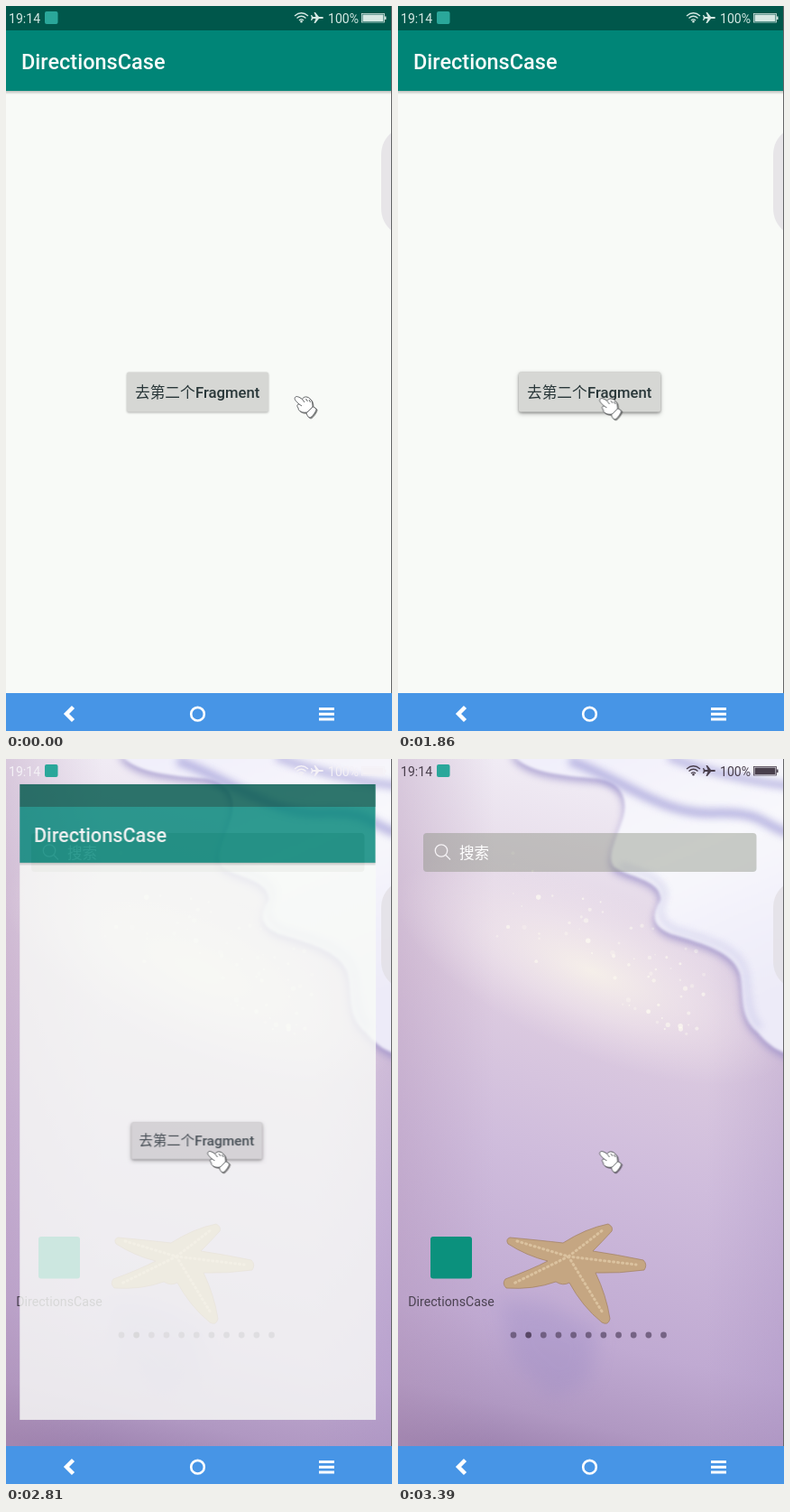
Recreate the animation shown at these times as an HTML page. Size 428 px wide and 803 px high, loop 3.49 s.

```html
<!DOCTYPE html>
<html lang="zh">
<head>
<meta charset="utf-8">
<title>Fragment demo</title>
<style>
  html, body { margin: 0; width: 100%; height: 100%; overflow: hidden; background: #f8faf7; }
  svg { display: block; width: 428px; height: 803px; }
  text { font-family: Roboto, "Noto Sans CJK SC", "Noto Sans CJK", sans-serif; }
  .medium { font-weight: 500; }
  #app { transform-origin: 200px 366px; }
  #status { color: #d5e8e3; font-size: 14.1px; }
  #raised, #ripple { opacity: 0; }
  #rest { filter: drop-shadow(0 1px 1px rgba(0, 0, 0, .28)); }
  #raised { filter: drop-shadow(0 2.5px 2.8px rgba(0, 0, 0, .3)); }
  #hand { filter: drop-shadow(1px 1.5px .7px rgba(0, 0, 0, .45)); }
</style>
</head>
<body>
<svg viewBox="0 0 428 803">
  <defs>
    <linearGradient id="sand" x1=".25" y1="0" x2=".12" y2="1">
      <stop offset="0" stop-color="#f0ebf4"/>
      <stop offset=".16" stop-color="#e6dbe9"/>
      <stop offset=".34" stop-color="#dccbe0"/>
      <stop offset=".55" stop-color="#cfbcdc"/>
      <stop offset=".8" stop-color="#c0aad2"/>
      <stop offset=".92" stop-color="#b098c2"/>
      <stop offset="1" stop-color="#9a7fac"/>
    </linearGradient>
    <linearGradient id="edge">
      <stop offset="0" stop-color="#b394b8" stop-opacity=".36"/>
      <stop offset=".25" stop-color="#b394b8" stop-opacity="0"/>
      <stop offset=".8" stop-color="#9f86bd" stop-opacity="0"/>
      <stop offset="1" stop-color="#9f86bd" stop-opacity=".25"/>
    </linearGradient>
    <radialGradient id="glow">
      <stop offset="0" stop-color="#f9f4ea" stop-opacity=".85"/>
      <stop offset=".5" stop-color="#f5ecee" stop-opacity=".5"/>
      <stop offset="1" stop-color="#f0e4ec" stop-opacity="0"/>
    </radialGradient>
    <linearGradient id="foam" x1="0" y1="0" x2=".4" y2="1">
      <stop offset="0" stop-color="#f0eefa"/>
      <stop offset=".5" stop-color="#f8f8fc"/>
      <stop offset="1" stop-color="#edebf8"/>
    </linearGradient>
    <linearGradient id="under" x1="0" y1="0" x2="0" y2="1">
      <stop offset="0" stop-opacity=".3"/>
      <stop offset="1" stop-opacity="0"/>
    </linearGradient>
    <filter id="soft" x="-30%" y="-30%" width="160%" height="160%"><feGaussianBlur stdDeviation="4"/></filter>
    <filter id="haze" x="-30%" y="-30%" width="160%" height="160%"><feGaussianBlur stdDeviation="11"/></filter>
    <filter id="smooth"><feGaussianBlur stdDeviation="1.5"/></filter>
    <clipPath id="buttonClip"><rect x="134" y="405.5" width="157" height="44" rx="2"/></clipPath>
    <clipPath id="screen"><rect width="428" height="762"/></clipPath>
    <path id="wave" d="M125-8C140 16 180 18 222 22C246 26 256 42 249 66C241 90 230 110 240 120
      C258 132 292 134 291 156C279 176 284 186 303 194C340 205 372 214 379 238C384 260 377 284 398 302
      C408 314 418 323 436 328V-8Z"/>
  </defs>

  <g id="home" clip-path="url(#screen)">
    <rect width="428" height="762" fill="url(#sand)"/>
    <rect width="428" height="762" fill="url(#edge)"/>
    <ellipse cx="215" cy="235" rx="235" ry="90" fill="url(#glow)" transform="rotate(24 215 235)"/>
    <g id="sparkles" fill="#fffdf2"/>
    <use href="#wave" fill="#9489c6" opacity=".7" filter="url(#soft)" transform="translate(-1 5)"/>
    <use href="#wave" fill="url(#foam)" filter="url(#smooth)"/>
    <g fill="none" stroke="#9c98d6" filter="url(#soft)" opacity=".75">
      <path d="M190 2C250 22 290 62 350 60S405 76 435 82" stroke-width="9"/>
      <path d="M246 118C266 126 292 128 296 150C286 172 292 182 308 189C345 200 377 208 385 234
        C390 258 385 280 402 298" stroke-width="4" opacity=".6"/>
      <path d="M300-2Q365 22 435 30" stroke-width="7"/>
    </g>
    <path d="M112 600L165 604L222 634L212 690L172 708L128 668Z" fill="#9687c4" opacity=".3" filter="url(#haze)"/>
    <path d="M124 530Q157 533 183 536Q208 520 233 515Q239 518 237 523Q226 535 216 545Q243 549 272 555
      Q277 560 273 566Q245 570 219 569Q231 594 235 620Q233 628 226 624Q204 606 190 580
      Q183 584 175 579Q150 588 120 586Q115 581 119 576Q149 565 166 556Q142 550 122 537Q119 532 124 530Z"
      fill="#c5a682" stroke="#a58468" stroke-width=".8"/>
    <path d="M132 534L189 551L228 521M189 551L264 560M189 551L228 615M189 551L128 581"
      fill="none" stroke="#dbc29f" stroke-width="3" stroke-linecap="round" stroke-dasharray="1 4"/>

    <rect x="28" y="82" width="369.5" height="43" rx="4" fill="#878c7c" fill-opacity=".42"/>
    <g fill="none" stroke="#f5f2f5" stroke-width="1.3"><circle cx="48" cy="101.500" r="6.7"/><path d="M53 106.500l5 5"/></g>
    <text x="68" y="109.500" font-size="16.6" fill="#fff">搜索</text>
    <rect x="36" y="529" width="46" height="46.500" rx="3" fill="#0b917d"/>
    <text x="59" y="606" font-size="14.2" text-anchor="middle" fill="#4b4251">DirectionsCase</text>
    <g id="pages" fill="#584765"/>
  </g>

  <g id="app">
    <rect width="427" height="762" fill="#f8faf7"/>
    <rect y="93" width="427" height="5" fill="url(#under)"/>
    <rect width="427" height="94" fill="#008577"/>
    <rect width="427" height="27" fill="#00574b"/>
    <text class="medium" x="17" y="69.500" font-size="23.5" fill="#f8fbfa">DirectionsCase</text>
    <g fill="#d6d7d4">
      <rect id="rest" x="134" y="405.5" width="157" height="44" rx="2"/>
      <rect id="raised" x="134" y="405.5" width="157" height="44" rx="2"/>
    </g>
    <g clip-path="url(#buttonClip)"><circle id="ripple" r="1" fill="#000"/></g>
    <text x="143" y="433.500" font-size="16.7" fill="#283638">去第二个<tspan class="medium" x="210">Fragment</tspan></text>
  </g>

  <path d="M428 140C421 145 416 154 416 165V224C416 235 421 244 428 249Z" fill="#e2dfe4" fill-opacity=".78"/>
  <path d="M427.500 0V761" stroke="#636466"/>

  <rect x="43" y="6" width="14.500" height="14" rx="2" fill="#2aa79a"/>
  <g id="status" fill="currentColor">
    <text x="3" y="18.500">19:14</text>
    <text x="357" y="18.500">100%</text>
    <g fill="none" stroke="currentColor" stroke-width="1.3">
      <path d="M320 11Q327.500 4.500 335 11M322.500 13.500Q327.500 9 332.500 13.500M325 16Q327.500 13.800 330 16"/>
      <rect x="394.500" y="8.500" width="25" height="9.500" stroke-width=".8"/>
    </g>
    <circle cx="327.500" cy="17.300" r="1.2"/>
    <path d="M352 13Q352 12 350.500 12H347L343 7H341.500L343.500 12H340.500L339 10H338L338.800 13L338 16H339L340.500 14H343.500L341.500 19H343L347 14H350.500Q352 14 352 13Z"/>
    <path d="M395.500 9.500H418.500V17H395.500ZM420 11.500H421.500V15H420Z"/>
  </g>

  <rect y="761" width="428" height="42" fill="#4795e6"/>
  <g fill="none" stroke="#fff">
    <path d="M74.500 776.500L67 784L74.500 791.500" stroke-width="4.400"/>
    <circle cx="212.500" cy="784.200" r="7.300" stroke-width="2.600"/>
    <path d="M347 778.500H364M347 784.300H364M347 790H364" stroke-width="3"/>
  </g>

  <g id="hand" fill="#fff" stroke="#505355" stroke-width=".9" stroke-linejoin="round">
    <path d="M14 19L21 12.500L25 15C26 17 20 25 18 25C16 25 14 21 14 19Z"/>
    <path d="M1.500 2.500C3 .500 6 2 9.500 4.500C11 1 16 1 19 5C21 7 21 11 21 13L15 19C10 20 5 18 5 14C3 12 4 10 6 10C4 8 0 5 1.500 2.500Z"/>
    <path d="M9.500 4.500L12 8M13.500 4L15.500 7M17 5L18.500 8M6 10L9 12" fill="none"/>
  </g>
</svg>
<script>
  const LOOP = 3490;
  const $ = id => document.getElementById(id);

  // Steps are [ms, value, easing towards the next step].
  function play(id, property, steps) {
    const all = [[0, steps[0][1]], ...steps, [LOOP, steps.at(-1)[1]]];
    $(id).animate(
      all.map(([ms, value, easing = 'linear']) => ({ offset: ms / LOOP, [property]: value, easing })),
      { duration: LOOP, iterations: Infinity });
  }

  function addDot(parent, cx, cy, r, opacity) {
    const dot = document.createElementNS('http://www.w3.org/2000/svg', 'circle');
    for (const [name, value] of Object.entries({ cx, cy, r, opacity })) dot.setAttribute(name, value);
    $(parent).append(dot);
  }

  let seed = 7;
  const random = () => (seed = seed * 16807 % 2147483647) / 2147483647;
  for (let i = 0; i < 70; i++) {
    const along = random();
    addDot('sparkles', 110 + along * 230, 150 + along * 120 + (random() - .5) * 110,
      .8 + random() * 2, .25 + random() * .4);
  }
  for (let i = 0; i < 11; i++) addDot('pages', 128 + i * 16.65, 638, 3.4, i === 1 ? 1 : .72);

  const at = (x, y) => `translate(${x}px, ${y}px)`;
  const handSteps = [[440, at(319, 431), 'step-end']];
  for (let i = 1; i <= 7; i++) {
    const p = i / 7, eased = p * p * (3 - 2 * p);
    handSteps.push([410 + 30 * i, at(319 - 96 * eased, 431 + 2 * eased), 'step-end']);
  }
  handSteps.push([790, at(222.500, 433), 'step-end']);
  play('hand', 'transform', handSteps);

  play('ripple', 'transform', [
    [1120, at(233, 440) + ' scale(5)', 'ease-out'],
    [1420, at(215, 429) + ' scale(86)']]);
  play('ripple', 'opacity', [[1120, 0], [1200, .055], [1420, .055], [1600, 0]]);
  play('raised', 'opacity', [[1420, 0], [1600, 1]]);

  play('app', 'transform', [
    [2560, 'scale(1)'], [2810, 'scale(.924)'], [2930, 'scale(.882)'], [3050, 'scale(.845)']]);
  play('app', 'opacity', [[2600, 1], [2690, .95], [2810, .82], [2930, .5], [3050, 0]]);
  play('status', 'color', [
    [2600, '#d5e8e3'], [2700, '#f4f1f6'], [2830, '#f4f1f6'],
    [2930, '#716a75'], [3050, '#584f5b'], [3390, '#493f4c']]);
</script>
</body>
</html>
```
